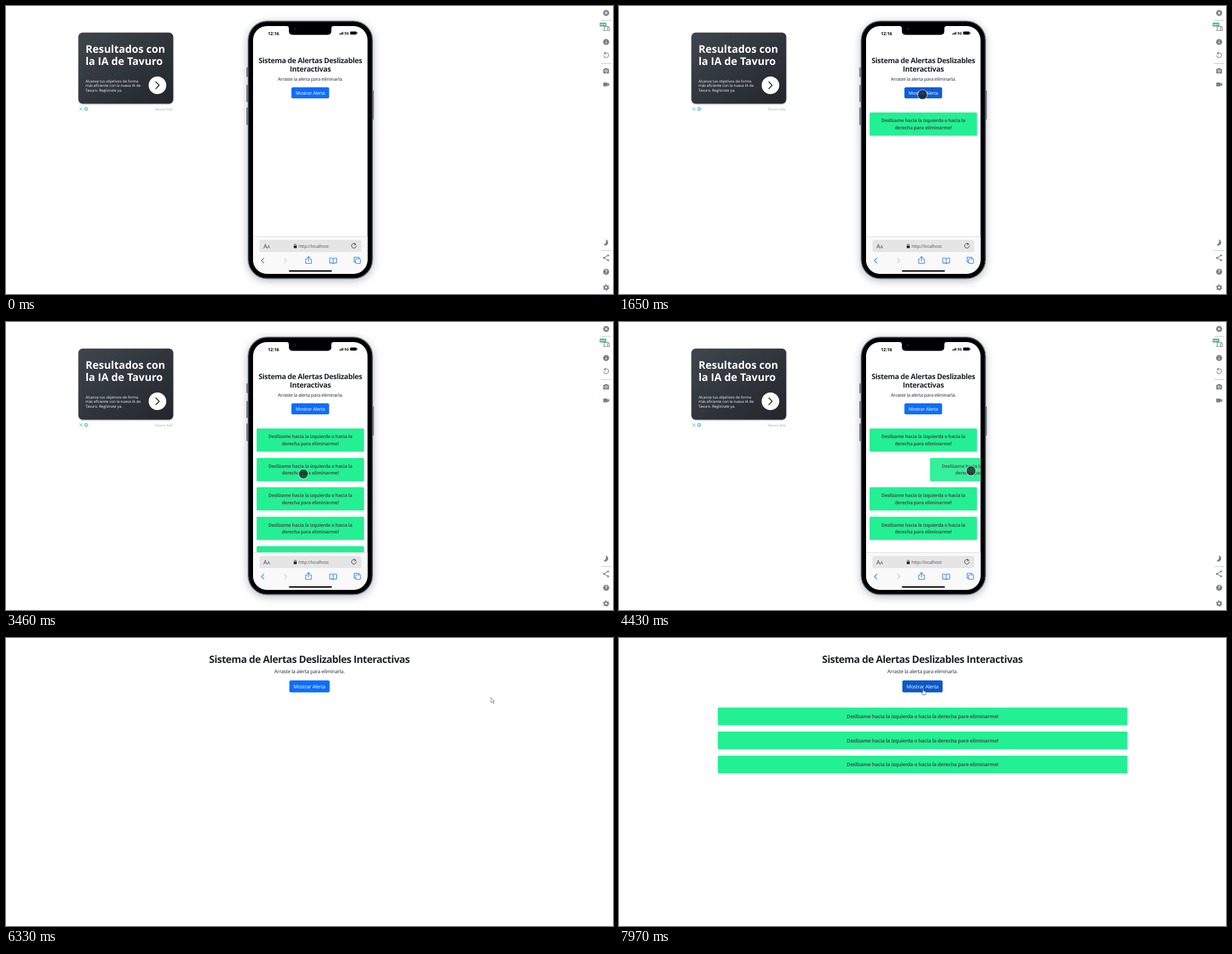
An HTML page for the animation above (8 s loop, 1000 by 474 pixels).

```html
<!DOCTYPE html>
<html lang="es">
<head>
<meta charset="utf-8">
<title>Alertas deslizables</title>
<style>
  html, body { margin: 0; width: 100%; height: 100%; overflow: hidden; background: #fff; }
  svg { display: block; }
  text { font-family: "Open Sans", "Noto Sans", sans-serif; text-rendering: geometricPrecision; }
  .mid { text-anchor: middle; }
  .bold { font-weight: 700; }
  .ui { letter-spacing: -.028em; }
  .ui.bold, .alert text { letter-spacing: -.033em; }
  .ink { fill: #212529; }
  .alert rect { fill: #22f092; }
  .alert text { fill: #485650; font-weight: 700; text-anchor: middle; }
  .line { fill: none; stroke-linecap: round; stroke-linejoin: round; }
  .blue { stroke: #2a83f5; stroke-width: 1.1; }
</style>
</head>
<body>
<svg width="1000" height="474" viewBox="0 0 1000 474">
  <defs>
    <linearGradient id="adFill" x1="0" y1="0" x2="1" y2="1">
      <stop offset="0" stop-color="#3f464d"/><stop offset="1" stop-color="#22262c"/>
    </linearGradient>
    <clipPath id="page"><rect x="407" y="33" width="188.6" height="346"/></clipPath>
    <clipPath id="screen"><rect x="407" y="33" width="188.6" height="407.8" rx="23"/></clipPath>
  </defs>

  <g id="phoneView">
    <g id="ad">
      <rect x="119.3" y="43.7" width="156.2" height="117" rx="7" fill="url(#adFill)" style="filter:drop-shadow(0 1px 1px #0005)"/>
      <g fill="#fff">
        <g class="bold" font-size="17.4">
          <text x="131" y="76.5">Resultados con</text>
          <text x="131" y="97">la IA de Tavuro</text>
        </g>
        <g font-size="6.1">
          <text x="131" y="125.5">Alcanza tus objetivos de forma</text>
          <text x="131" y="133">más eficiente con la nueva IA de</text>
          <text x="131" y="140.5">Tavuro. Regístrate ya.</text>
        </g>
        <circle cx="249.5" cy="130.5" r="14.5"/>
      </g>
      <path class="line" d="M247 125l5.3 5.5l-5.3 5.5" stroke="#22262c" stroke-width="1.7"/>
      <g class="line" stroke="#1aa5dc" stroke-width=".9">
        <path d="M121.5 167.5l4 4m0-4l-4 4M132 169v2m0-3.2v.1"/>
        <circle cx="132" cy="169.5" r="2.7"/>
      </g>
      <text x="244.5" y="172" font-size="5.9" fill="#a9a9a9">Tavuro Ads</text>
    </g>

    <g id="phone">
      <g fill="#77859a">
        <rect x="396" y="101" width="4" height="16" rx="1"/>
        <rect x="396" y="130" width="4" height="28" rx="1"/>
        <rect x="396" y="167" width="4" height="29" rx="1"/>
        <rect x="602" y="139" width="4" height="48" rx="1"/>
      </g>
      <rect x="398.8" y="24.8" width="205.2" height="424" rx="31.5" fill="#000" stroke="#7d8b9e" stroke-width="1.2" style="filter:drop-shadow(0 3px 7px #0004)"/>
      <rect x="400" y="26" width="202.8" height="421.6" rx="30" fill="none" stroke="#29313b"/>
      <rect x="407" y="33" width="188.6" height="407.8" rx="23" fill="#fff"/>
      <path d="M462 33q4 0 4 4v4q0 6.500 6.500 6.500h57q6.500 0 6.500-6.500v-4q0-4 4-4z"/>
      <circle cx="476" cy="38" r="2" fill="#171b25"/>
      <text class="bold" x="431.5" y="47.5" font-size="7.2">12:16</text>
      <path d="M549 47v-1.500h1.200V47zM550.800 47v-2.500h1.200V47zM552.600 47v-3.500h1.200V47zM554.400 47v-4.500h1.200V47z"/>
      <text class="bold" x="557.5" y="47" font-size="5.8">5G</text>
      <rect x="567" y="42" width="10.5" height="5" rx="1.3"/><rect x="578" y="43.5" width="1" height="2"/>

      <g clip-path="url(#page)">
        <g class="ink" font-size="12.1">
          <text class="ui bold mid" x="501.3" y="94">Sistema de Alertas Deslizables</text>
          <text class="ui bold mid" x="501.3" y="108.3">Interactivas</text>
        </g>
        <text class="ui mid ink" x="501.4" y="122.5" font-size="7.7">Arraste la alerta para eliminarla.</text>
        <rect id="phoneButton" x="470.2" y="133.7" width="62.1" height="18.2" rx="2.5"/>
        <text class="ui mid" x="501.3" y="145.5" font-size="7.7" fill="#fff">Mostrar Alerta</text>
        <g id="phoneAlerts"></g>
      </g>

      <g clip-path="url(#screen)">
        <rect x="407" y="379" width="189" height="62" fill="#f9f9f9"/>
        <path d="M407 379.500h189" stroke="#dedede"/>
      </g>
      <rect x="417.5" y="385" width="168" height="20" rx="3.5" fill="#e5e5e6"/>
      <text x="424" y="398.7" font-size="10" fill="#444">A<tspan font-size="7.5">A</tspan></text>
      <rect x="474" y="394.5" width="5" height="4" rx=".7" fill="#222"/>
      <path class="line" d="M475 394.500v-1a1.500 1.500 0 0 1 3 0v1" stroke="#222" stroke-width=".9"/>
      <text class="ui" x="482" y="398" font-size="7.4" fill="#555">http://localhost</text>
      <path class="line" d="M576.500 392.800a3.800 3.800 0 1 0 .5 2.200M573.500 390.300l2.300 1.500-2 1.800" stroke="#333"/>
      <g class="line blue">
        <path d="M424.800 415l-4 4 4 4"/>
        <path d="M458.500 415l4 4-4 4" stroke="#ccc"/>
        <path d="M496 416.500h-2.300v7h9.400v-7h-2.300M498.400 420v-7.500m-2.200 2.200l2.200-2.200 2.200 2.200"/>
        <path d="M539 416q-2.500-1.800-5.700-1v8q3.200-.6 5.700 1 2.500-1.600 5.700-1v-8q-3.200-.8-5.700 1zv8"/>
        <path d="M576 421.500h-2.500v-8h8v2.500"/><rect x="576" y="416" width="8" height="7.5" rx="1.3"/>
      </g>
      <rect x="466" y="435" width="71" height="2.2" rx="1.1"/>
    </g>

    <g id="tools" fill="#7b808a">
      <path class="line" stroke="#c4c6ca" d="M981 23.500h16M981 94.500h16M981 402.500h16"/>
      <circle cx="988.7" cy="11.5" r="5"/><circle cx="988.7" cy="59.3" r="5"/><circle cx="988.7" cy="437.5" r="5"/>
      <path class="line" d="M987 9.800l3.400 3.400m0-3.400l-3.400 3.400M988.700 59v2.500m0-5v.1" stroke="#fff" stroke-width="1.1"/>
      <text class="bold mid" x="988.7" y="440.3" font-size="8" fill="#fff">?</text>
      <g class="line" stroke="#7b808a" stroke-width="1.1">
        <path d="M984 40.300h6m-4.500-1.200v-5.600h7M985.500 78.600a4 4 0 1 1-.7 3M987.500 75.800l-2.200 2.600 3 1.200"/>
        <rect x="991" y="35" width="3" height="5.5" rx=".5"/>
        <path d="M992 410.500l-7 4 7 4"/>
        <circle cx="988.7" cy="463.3" r="2.8" stroke-width="2.2"/>
        <circle cx="988.7" cy="463.3" r="4.5" stroke-width="1.5" stroke-linecap="butt" stroke-dasharray="2.356"/>
      </g>
      <rect x="978" y="27.5" width="11" height="6" rx="1" fill="#28b463"/>
      <text class="bold mid" x="983.5" y="32.2" font-size="4.2" fill="#fff">NEW</text>
      <path d="M984 103.500h2.200l1-1.500h3l1 1.500h2.200v7.500h-9.400z"/>
      <circle cx="988.7" cy="107" r="1.9" fill="none" stroke="#fff"/>
      <path d="M984 126h7v2.200l2.700-2v5.800l-2.700-2v2.200h-7z"/>
      <path d="M988 384.300a5 5 0 1 1-3.800 9a6.500 6.500 0 0 0 3.800-9z"/>
      <circle cx="992" cy="410.5" r="1.6"/><circle cx="985" cy="414.5" r="1.6"/><circle cx="992" cy="418.5" r="1.6"/>
    </g>
  </g>

  <g id="deskView">
    <text class="ui bold mid ink" x="499.8" y="41.3" font-size="16.6">Sistema de Alertas Deslizables Interactivas</text>
    <text class="ui mid ink" x="500" y="58.2" font-size="8.3">Arraste la alerta para eliminarla.</text>
    <rect id="deskButton" x="466.8" y="69.8" width="66.4" height="19.6" rx="2.7"/>
    <text class="ui mid" x="500" y="82.6" font-size="8.3" fill="#fff">Mostrar Alerta</text>
    <g id="deskAlerts"></g>
  </g>

  <circle id="touch" r="8" fill="#141c20" fill-opacity=".72" stroke="#fff" stroke-opacity=".65" stroke-width="1.2"/>
  <path id="arrow" d="M0 0v8.500l2-1.800 1.500 3.200 1.400-.6-1.500-3.100h2.700z" fill="#fff" stroke="#444" stroke-width=".6"/>
  <path id="hand" d="M-.8 .8q.8-1.300 1.600 0v3.400l3 .7q1 .4.800 1.600l-.7 4h-4.500l-2.600-3.800q.5-1 1.600-.2l.8.800z" fill="#fff" stroke="#333" stroke-width=".7"/>
</svg>

<script>
const LOOP = 8000, DESKTOP_AT = 6330;
const $ = id => document.getElementById(id);
const show = (el, on) => el.style.display = on ? '' : 'none';

// Pointer stops: time, x, y
const path = [
  [210, 592, 260], [720, 512, 165], [970, 512, 165], [1150, 500, 146], [2310, 500, 146],
  [2600, 524, 190], [2850, 585, 194], [2950, 585, 194], [3300, 490, 250], [3460, 490, 250],
  [3660, 415, 250], [3770, 415, 250], [4100, 490, 242], [4200, 490, 242], [4420, 580, 245],
  [4600, 580, 245], [5160, 883, -2], [5520, 883, -2], [5850, 988, 10], [6050, 988, 10],
  [6330, 799, 98], [7110, 501, 83]
];
const FLY = 150;
const phoneAlerts = [
  { born: 1570, grab: 2600, drop: 2850 },
  { born: 1700 },
  { born: 1830, grab: 3460, drop: 3660 },
  { born: 1960, grab: 4200, drop: 4420 },
  { born: 2090 },
  { born: 2210 }
];
const deskAlerts = [7400, 7650, 7880].map(born => ({ born }));

function makeAlert(parent, x, width, height, size, lines) {
  const g = document.createElementNS('http://www.w3.org/2000/svg', 'g');
  g.setAttribute('class', 'alert');
  g.innerHTML = `<rect x="${x}" width="${width}" height="${height}" rx="1.5"/>` + lines.map(([y, s]) =>
    `<text x="${x + width / 2}" y="${y}" font-size="${size}">${s}</text>`).join('');
  return parent.appendChild(g);
}
const start = 'Deslízame hacia la izquierda o hacia la', end = 'derecha para eliminarme!';
for (const a of phoneAlerts)
  a.el = makeAlert($('phoneAlerts'), 412.8, 177, 38.2, 7.75, [[16.2, start], [27.6, end]]);
for (const a of deskAlerts)
  a.el = makeAlert($('deskAlerts'), 162.7, 674.8, 29, 8.3, [[17.5, start + ' ' + end]]);

function pointer(t) {
  const i = path.findIndex(p => p[0] > t);
  if (i < 0) return path[path.length - 1].slice(1);
  if (i === 0) return path[0].slice(1);
  const [t0, x0, y0] = path[i - 1], [t1, x1, y1] = path[i];
  const u = (t - t0) / (t1 - t0), e = u * u * (3 - 2 * u);
  return [x0 + (x1 - x0) * e, y0 + (y1 - y0) * e];
}

function layout(alerts, t, top, pitch) {
  let slot = 0;
  for (const { el, born, grab, drop } of alerts) {
    const alive = t >= born && !(t >= drop + FLY);
    show(el, alive);
    if (!alive) continue;
    let dx = 0, opacity = 1;
    if (t > grab) {
      dx = pointer(Math.min(t, drop))[0] - pointer(grab)[0];
      const fly = Math.max(0, (t - drop) / FLY);
      dx += Math.sign(dx) * 130 * fly;
      opacity = 1 - fly;
    }
    el.setAttribute('transform', `translate(${dx} ${top + slot++ * pitch})`);
    el.setAttribute('opacity', opacity);
  }
}

function draw() {
  const t = performance.now() % LOOP, desktop = t >= DESKTOP_AT;
  const [x, y] = pointer(t);
  show($('phoneView'), !desktop);
  show($('deskView'), desktop);
  layout(phoneAlerts, t, 175.3, 48.4);
  layout(deskAlerts, t, 114.5, 39.6);

  const overButton = desktop && x > 466 && x < 534 && y > 69 && y < 90;
  const overScreen = !desktop && x > 407 && x < 596 && y > 33 && y < 441;
  const kind = t < path[0][0] ? '' : overButton ? 'hand' : overScreen ? 'touch' : 'arrow';
  for (const id of ['touch', 'arrow', 'hand']) {
    show($(id), id === kind);
    $(id).setAttribute('transform', `translate(${x} ${y})`);
  }
  $('phoneButton').setAttribute('fill', t > 1460 && t < 2400 ? '#0b5ed7' : '#0d6efd');
  $('deskButton').setAttribute('fill', overButton ? '#0a58ca' : '#0d6efd');
  requestAnimationFrame(draw);
}
draw();
</script>
</body>
</html>
```
